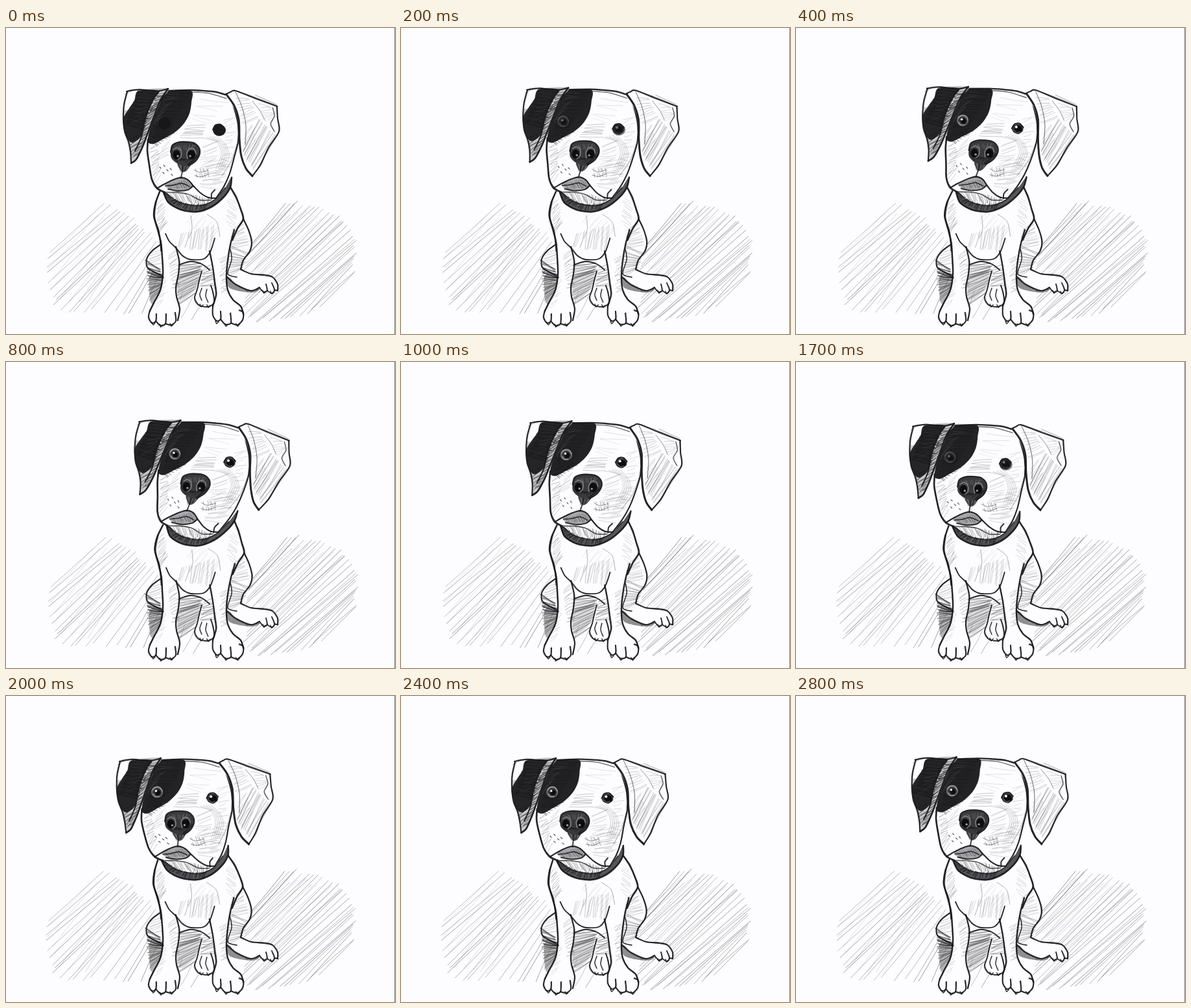
An HTML page with a canvas for the animation above (2900 ms loop, 600 by 473 pixels).

```html
<!DOCTYPE html>
<html lang="en">
<head>
<meta charset="utf-8">
<title>Sketched puppy</title>
<style>
html, body { margin: 0; width: 100%; height: 100%; overflow: hidden; background: #fdfcfe; }
canvas { display: block; width: 600px; height: 473px; }
</style>
</head>
<body>
<canvas id="c" width="600" height="473"></canvas>
<script>
const g = document.getElementById('c').getContext('2d');
const PAPER = '#fdfcfe', INK = '#1b1a1c', LOOP = 2900, STEP = 100;

// [time, value] tables
const LEAN = [[0, 0], [400, 13], [640, 17], [800, 16], [1300, 3], [1700, -5], [2100, -10], [2400, -9], [2800, -2], [2900, 0]];
const SHUT = [[0, 1], [100, .9], [200, .6], [400, 0], [1000, 0], [1300, .93], [1450, 1], [1700, .6], [2000, 0], [2900, 0]];

const clamp = v => Math.max(0, Math.min(1, v));
let seed, lean = 0, onGround = false;
const rnd = () => (seed = (seed * 16807) % 2147483647) / 2147483647;
const shake = a => (rnd() - .5) * 2 * a;

function linear(table, t) {
  const i = table.findIndex(k => k[0] > t);
  const [a, b] = [table[i - 1], table[i]];
  return a[1] + (b[1] - a[1]) * (t - a[0]) / (b[0] - a[0]);
}

function smooth(table, t) {
  const n = table.length - 1, i = table.findIndex(k => k[0] > t) - 1;
  const at = j => j < 0 ? [table[n + j][0] - LOOP, table[n + j][1]]
    : j > n ? [table[j - n][0] + LOOP, table[j - n][1]] : table[j];
  const slope = j => (at(j + 1)[1] - at(j - 1)[1]) / (at(j + 1)[0] - at(j - 1)[0]);
  const [a, b] = [at(i), at(i + 1)], h = b[0] - a[0], u = (t - a[0]) / h, v = 1 - u;
  return a[1] * (1 + 2 * u) * v * v + slope(i) * h * u * v * v
    + b[1] * u * u * (3 - 2 * u) - slope(i + 1) * h * u * u * v;
}

// The head tilts, the neck bends and the feet stay put
function warp([x, y]) {
  if (onGround) return [x + lean * .15, y];
  const k = clamp((285 - y) / 105), w = k * k * (3 - 2 * k);
  const side = w + Math.max(0, 180 - y) * .0025 + .12 * (1 - w) * clamp((360 - y) / 90);
  return [x + lean * side, y + lean * w * (x - 400) * .0016];
}

const parse = s => s.trim().split(/\s+/).map(p => p.split(',').map(Number));

function trace(points, closed) {
  const p = points.map(warp), n = p.length;
  const at = i => closed ? p[(i + n) % n] : p[Math.max(0, Math.min(n - 1, i))];
  g.beginPath();
  g.moveTo(...p[0]);
  for (let i = 0; i < (closed ? n : n - 1); i++) {
    const [a, b, c, d] = [at(i - 1), at(i), at(i + 1), at(i + 2)];
    g.bezierCurveTo(b[0] + (c[0] - a[0]) / 7, b[1] + (c[1] - a[1]) / 7,
      c[0] - (d[0] - b[0]) / 7, c[1] - (d[1] - b[1]) / 7, ...c);
  }
}

function stroke(points, width, alpha = 1, color = INK) {
  trace(points);
  g.globalAlpha = alpha;
  g.lineWidth = width;
  g.strokeStyle = color;
  g.stroke();
  g.globalAlpha = 1;
}

function fill(s, color, alpha = 1) {
  trace(parse(s), true);
  g.globalAlpha = alpha;
  g.fillStyle = color;
  g.fill();
  g.globalAlpha = 1;
}

// A firm pencil line with a loose second pass
function pen(s, width = 2, alpha = .92) {
  const p = parse(s);
  stroke(p, width, alpha);
  stroke(p.map(([x, y]) => [x + shake(1.3), y + shake(1.3)]), width * .45, alpha * .6);
}

function along(p, f) {
  const u = f * (p.length - 1), i = Math.min(p.length - 2, Math.floor(u)), k = u - i;
  return [0, 1].map(j => p[i][j] + (p[i + 1][j] - p[i][j]) * k);
}

// Lines running from edge a to edge b
function hatch(a, b, n, width = .8, alpha = .5, wobble = 2, color = INK) {
  const p = parse(a), q = parse(b);
  for (let i = 0; i < n; i++) {
    const f = clamp((i + shake(.3)) / (n - 1));
    const s = along(p, f).map(v => v + shake(wobble)), e = along(q, f).map(v => v + shake(wobble));
    const m = [(s[0] + e[0]) / 2 + shake(1), (s[1] + e[1]) / 2 + shake(1)];
    stroke([s, m, e], width, alpha * (.65 + rnd() * .5), color);
  }
}

function disc(x, y, rx, color, alpha = 1, ry = rx) {
  g.globalAlpha = alpha;
  g.fillStyle = color;
  g.beginPath();
  g.ellipse(...warp([x, y]), rx, ry, 0, 0, 7);
  g.fill();
  g.globalAlpha = 1;
}

function ground() {
  onGround = true;
  hatch('66,346 64,400 82,437 150,438 215,445 290,450', '150,268 190,290 210,308 228,325 240,385 300,425', 24, .9, .42, 4);
  hatch('66,352 80,420 140,425', '130,285 180,300 205,325', 9, .6, .25, 5);
  hatch('375,335 372,370 366,435 385,452 430,451 485,430', '435,268 468,272 515,288 536,322 538,350 536,380', 28, .9, .45, 4);
  hatch('372,345 385,375 395,410', '430,285 475,285 525,300', 10, .7, .32, 5);
  onGround = false;
  // cast shadow
  fill('222,383 242,385 238,405 228,426 222,420', '#777', .55);
  fill('264,384 297,376 292,404 268,420', '#999', .35);
  fill('341,383 362,378 390,402 378,409 345,402', '#555', .65);
  hatch('217,376 223,420', '242,382 238,405', 15, 1, .6);
  hatch('264,385 264,430', '300,372 290,412', 15, .9, .5);
  hatch('340,382 374,408', '364,375 394,402', 15, 1.1, .65);
  hatch('322,392 320,440', '338,388 330,425', 10, .8, .4);
}

function body() {
  fill(`238,335 225,345 217,357 218,370 230,379 243,384 264,380 270,364 302,365 302,376 293,405 291,418 297,428
    310,431 322,426 341,386 355,397 378,406 390,402 405,409 418,407 420,396 410,384 378,380 362,372 376,345 379,330
    374,312 366,295 350,300`, PAPER);
  fill(`238,252 230,272 228,290 234,312 239,335 242,380 238,405 227,425 221,440 226,456 240,459 262,454 268,435
    262,412 267,370 264,346 285,358 305,357 316,346 322,395 324,412 319,430 321,448 332,457 350,458 365,450 364,434
    350,420 342,405 340,382 346,335 357,310 366,295 360,272 346,246`, PAPER);

  hatch('216,360 220,384', '238,372 242,388', 13, 1.2, .6);
  hatch('222,350 218,365', '238,342 240,362', 7, .7, .35);
  hatch('266,366 268,388', '300,364 302,376', 12, .9, .5);
  hatch('304,372 300,400', '317,366 321,396', 12, .9, .5);
  hatch('345,338 341,384', '372,350 362,374', 16, .8, .45);
  hatch('350,312 346,340', '364,298 374,335', 13, .7, .35);
  hatch('262,342 266,400', '252,352 257,402', 14, .7, .4);
  hatch('340,350 341,405', '330,358 333,408', 14, .7, .4);
  hatch('264,338 315,345', '270,318 320,306', 16, .7, .32);
  hatch('232,275 236,320', '241,266 247,306', 14, .7, .4);
  hatch('355,270 354,312', '343,262 341,302', 10, .6, .3);
  hatch('280,300 310,335', '294,284 330,310', 9, .5, .25);
  hatch('238,395 230,430', '248,388 242,424', 8, .6, .3);

  pen('237,253 231,270 228,290 234,312 239,332 241,355 242,380 238,405 228,425 222,437', 2.5);
  pen('231,268 229,292 236,315 239,345', 1.5);
  pen('262,338 267,360 266,380 262,400 263,415 268,434 265,452', 2.2);
  pen('246,318 252,330 262,340 272,352 285,358 305,357 315,346 322,325', 1.8);
  pen('314,345 319,370 322,395 324,412 319,430', 2.3);
  pen('352,312 346,335 342,360 340,385 342,405 350,420 362,430 366,442', 2.4);
  pen('346,246 355,262 362,280 366,295 357,310 349,328', 2.6);
  pen('366,295 374,312 379,330 376,345 366,359 362,373', 2.2);
  pen('346,342 348,358 342,380 356,385', 1.4);
  pen('362,373 378,380 398,382 411,385 419,396 419,406', 2.1);
  pen('341,385 355,397 378,406 391,401', 2.1);
  pen('238,335 225,345 217,357 218,370 230,378 242,384', 2.1);
  pen('267,366 285,361 302,365 314,374', 1.8);
  pen('302,376 298,390 295,404 291,417 297,428 310,431 321,425 319,408 316,398', 1.9);
  pen('302,402 299,412 302,421', 1.3);
  pen('310,404 308,414 312,424', 1.3);
  pen('285,290 287,310 282,325', .7, .4);
  pen('310,288 325,300 330,322', .7, .4);

  // front paws
  pen('222,437 220,447 225,456 231,453 232,442', 2.1);
  pen('231,453 238,460 246,457 247,442', 2.1);
  pen('246,457 255,459 262,453 261,440', 2.1);
  pen('319,430 319,444 325,453 331,450 331,438', 2.1);
  pen('331,450 338,458 347,456 346,441', 2.1);
  pen('347,456 357,459 365,451 366,440 360,436', 2.1);
  // rear paw
  pen('391,401 397,408 403,406 401,396', 1.8);
  pen('403,406 410,410 414,405 410,394', 1.8);
  pen('414,405 419,406', 2);
  for (const [x, y] of [[228, 455], [240, 458], [256, 457], [326, 453], [340, 457], [358, 457], [302, 427], [313, 428], [399, 406], [411, 407]]) {
    pen(`${x - 3},${y} ${x - 1},${y + 4} ${x + 2},${y + 1}`, 1.4);
  }
}

function collar() {
  fill('243,252 258,265 280,273 301,274 322,265 338,247 347,232 346,246 336,261 318,276 295,284 270,281 251,271', '#56555a');
  hatch('243,254 254,270 280,282 308,280', '249,257 262,266 284,273 308,272', 26, 1.4, .7, 1);
  pen('243,254 251,270 270,281 295,284 318,276 336,261 346,246 348,231', 2.6);
  pen('248,256 262,267 282,273 302,274 322,265 338,247', 1.4);
}

function rightEar() {
  fill('338,103 353,97 385,109 418,121 421,160 405,185 392,212 380,229 368,218 361,195 360,150 352,125', PAPER);
  hatch('365,190 384,222', '390,140 416,168', 14, .7, .45);
  hatch('366,165 372,208', '379,150 389,180', 9, .6, .35);
  hatch('356,110 366,150', '374,108 388,137', 10, .6, .38);
  hatch('390,118 402,145', '408,122 416,137', 7, .6, .35);
  pen('338,103 346,99 354,97 385,109 418,121', 2.1);
  pen('418,121 419,140 421,160 405,185 392,212 380,229', 2.1);
  pen('340,103 352,120 359,142 360,172 363,198 370,217 380,229', 3);
  pen('354,99 364,122 370,150 369,180', 1, .55);
  pen('411,123 414,136 408,148 414,160', 1.2, .75);
  pen('380,113 392,128 399,143', .8, .5);
  pen('385,104 417,118', .7, .45);
}

function leftEar() {
  fill('187,98 206,95 250,94 238,112 227,140 217,167 208,190 199,206 193,208 191,190 183,160 181,135', '#c9c8cb');
  fill('187,99 204,97 200,110 189,126 182,124', PAPER);
  fill('204,97 236,97 226,112 215,140 209,166 196,177 188,172 183,158 181,140 190,124 198,112', '#252427');
  hatch('204,99 184,150', '232,100 212,158', 26, 1.6, .75, 2);
  hatch('208,100 192,150', '225,104 210,140', 9, .6, .25, 2, '#999');
  hatch('234,102 217,140 198,198', '246,101 228,132 205,194', 36, 1.1, .65, 1);
  hatch('190,172 194,200', '206,165 203,190', 13, .9, .6);
  pen('187,98 182,118 181,140 183,160 189,176 192,192 193,209', 2.1);
  pen('186,98 206,95 232,98 250,94', 2);
  pen('193,209 201,203 210,185 217,167 227,140 238,112 250,94', 2.7);
  pen('236,98 226,112 215,140 209,168 199,190', 1.9);
  pen('183,103 200,96 248,96', .7, .45);
}

function face() {
  fill(`240,98 285,97 325,99 343,104 352,125 359,150 358,175 352,200 345,225 336,245 324,263 300,268 262,256
    243,254 232,248 225,234 221,212 218,190 219,172`, PAPER);

  // soft shading
  hatch('352,135 349,200 333,240', '338,142 334,200 318,240', 22, .6, .3, 3);
  hatch('222,185 229,238', '233,180 238,225', 15, .7, .4);
  hatch('298,113 288,142', '340,113 310,148', 6, .5, .23, 3);
  hatch('279,151 270,171', '308,150 303,171', 7, .7, .42, 2);
  hatch('304,183 302,214', '327,171 320,212', 10, .6, .28, 3);
  hatch('240,187 232,205', '254,174 249,198', 7, .6, .3);
  hatch('312,210 298,248', '340,202 326,248', 13, .6, .33, 3);
  hatch('252,254 314,263', '263,268 311,274', 24, .8, .5, 2);
  for (let i = 0; i < 5; i++) {
    const d = i * 5;
    pen(`${304 + d},${170 - i} ${325 + d * .7},${176 + i} ${332 + d * .6},${194 + i} ${324 + d * .6},218`, .6, .28);
  }

  // eye patch
  fill('244,99 285,97 286,115 283,132 275,147 262,160 245,170 228,179 219,176 221,160 229,137 238,115', '#232225');
  hatch('250,98 225,168', '284,100 246,168', 28, 1.5, .6, 2);
  hatch('250,103 227,150', '268,103 240,130', 12, .6, .25, 2, '#999');
  hatch('250,165 225,176', '260,163 233,182', 9, 1, .6, 1);

  pen('246,97 283,96 305,97 325,99 344,105', 2.3);
  pen('283,99 312,101 340,109', 1.1, .7);
  pen('219,172 218,190 221,212 225,234 233,248 245,254', 2.7);
  pen('343,104 352,125 358,150 358,175 352,200 345,225 336,245 324,263', 2.1);
  pen('356,180 348,205 333,229', .8, .45);

  // muzzle
  fill('245,242 258,235 270,231 281,235 289,244 280,250 264,251 250,248', '#aaa9ad');
  hatch('249,241 282,235', '255,248 289,247', 16, .8, .5, 1);
  pen('233,248 243,242 257,235 270,231 281,235 289,244 300,255 312,262 324,263', 2.1);
  pen('246,244 258,243 271,240 283,245', 1.3);
  pen('250,249 265,252 281,250 288,244', 1.9);
  pen('243,254 262,254 281,257 299,266 316,266', 1.3, .8);
  pen('317,264 317,256 322,250', 1.8);
  fill('265,209 285,209 280,219 273,223 268,218', '#666');
  hatch('264,210 285,210', '270,222 278,221', 10, 1, .6, 1);
  pen('273,213 272,222 270,232', 1.5);
  for (const [x, y] of [[237, 215], [243, 212], [248, 219], [242, 223], [253, 217], [255, 226]]) {
    pen(`${x},${y} ${x + 2},${y + 2}`, 1.1, .7);
  }
  pen('290,219 299,223 312,220', .7, .6);
  pen('291,228 301,230 313,226', .7, .6);
  hatch('293,217 311,217', '295,222 313,223', 5, .8, .55, .5);
  hatch('293,226 311,225', '295,231 313,230', 5, .8, .55, .5);
}

function nose() {
  fill('254,192 257,181 269,176 288,177 297,184 299,194 293,205 282,213 273,213 262,208 255,201', '#39383b');
  hatch('260,182 292,181', '265,189 288,188', 13, 1.2, .5, 1, '#77767a');
  hatch('256,193 282,212', '264,206 297,198', 10, 1.4, .65, 1);
  disc(263, 196, 5.5, '#0d0c0e', 1, 7);
  disc(286, 196, 6, '#0d0c0e', 1, 7);
  stroke(parse('258,188 264,185 270,190 270,199 266,203'), 1.5, .7, '#a3a2a6');
  stroke(parse('280,202 279,193 284,186 291,188 293,194'), 1.5, .7, '#a3a2a6');
  disc(265, 198, 1.7, '#bbb', .8);
  disc(284, 198, 1.7, '#bbb', .8);
  pen('254,192 257,181 269,176 288,177 297,184 299,194 293,205 282,213', 1.9);
}

function eyes(shut) {
  disc(243, 146, 9, '#767579');
  disc(243, 147, 7.2, '#39383b');
  stroke(parse('236,143 240,139 247,139 251,145'), 1.2, .8, '#aaa');
  stroke(parse('237,149 240,153 246,153'), 1.3, .8, '#bbb');
  disc(244, 147, 4.2, '#0c0b0d');
  disc(241.5, 144.5, 1.8, '#eee');

  disc(328, 157, 9, '#39383b', 1, 7.5);
  disc(329, 158, 6, '#0c0b0d');
  stroke(parse('319,157 323,150 331,149 337,155'), 1.8);
  stroke(parse('322,162 329,165 336,160'), 1.2, .8);
  stroke(parse('323,160 327,163 332,162'), 1, .8, '#999');
  disc(326, 154.5, 2, '#fff');

  disc(244, 147, 10, '#171618', shut);
  disc(329, 158, 10, '#1b1a1c', shut, 9);
}

function draw(t) {
  seed = 4711;
  lean = smooth(LEAN, t);
  g.fillStyle = PAPER;
  g.fillRect(0, 0, 600, 473);
  g.lineCap = g.lineJoin = 'round';
  ground();
  body();
  collar();
  face();
  rightEar();
  leftEar();
  nose();
  eyes(linear(SHUT, t));
  g.fillStyle = '#8a898c';
  g.fillRect(599, 0, 1, 473);
}

const start = performance.now();
let shown = -1;
function tick() {
  const step = Math.floor((performance.now() - start) % LOOP / STEP);
  if (step !== shown) draw((shown = step) * STEP);
  requestAnimationFrame(tick);
}
tick();
</script>
</body>
</html>
```
